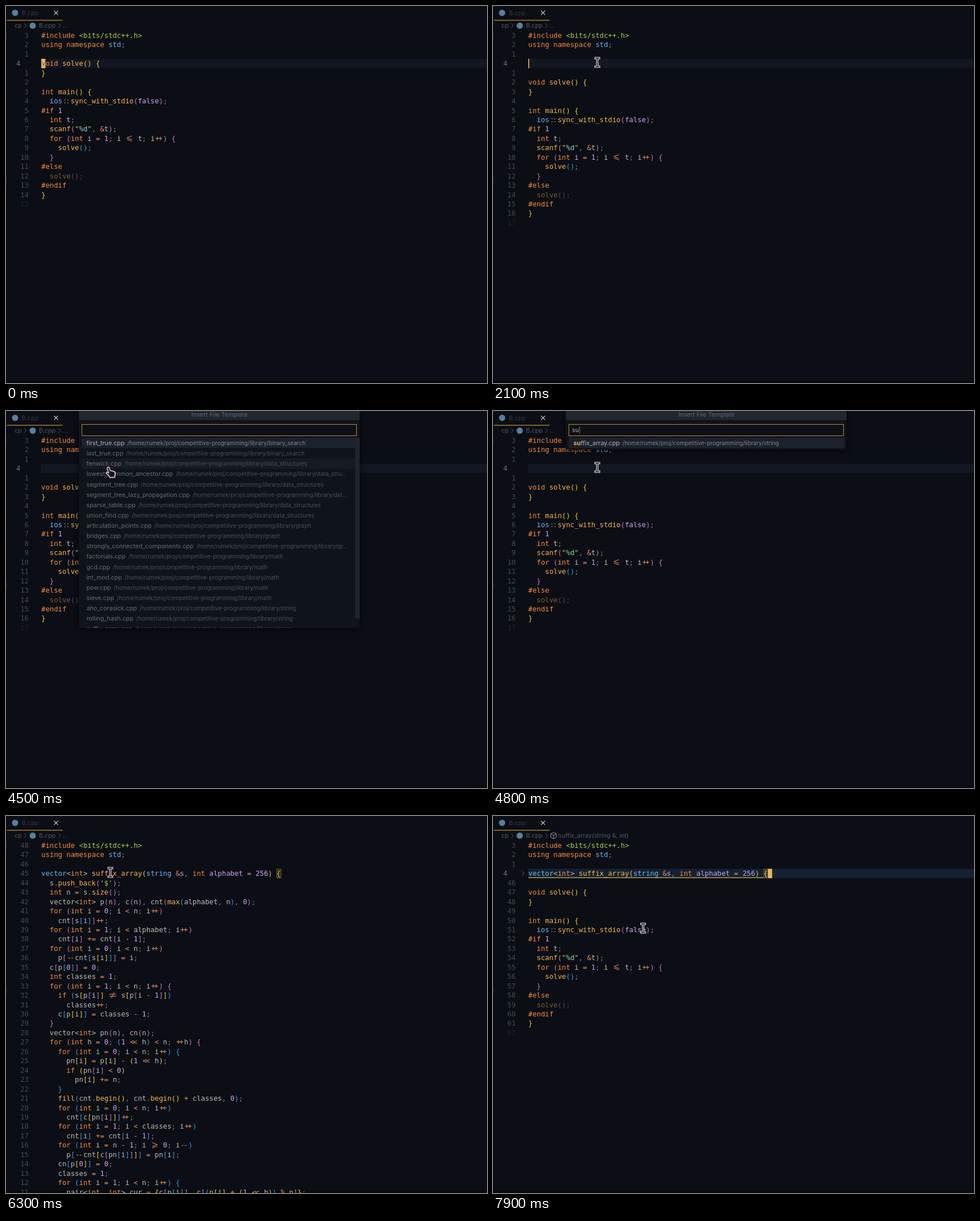
These frames come from a looping animation (846x662 px, 8000 ms). An HTML page:

```html
<!DOCTYPE html>
<html lang="en">
<head>
<meta charset="utf-8">
<title>Inserting a file template</title>
<style>
html, body { margin: 0; width: 100%; height: 100%; overflow: hidden; background: #0b0e14; }
svg { display: block; }
text { white-space: pre; }
.code { font: 12.27px "DejaVu Sans Mono", monospace; }
.ui { font: 10.7px Inter, sans-serif; }
.path { font-size: 10px; }
.panel { filter: drop-shadow(0 1px 5px #000a); }
</style>
</head>
<body>
<svg id="stage" width="846" height="662" viewBox="0 0 846 662"></svg>
<script>
(() => {
const LOOP = 8000;
const X0 = 62, TOP = 43.4, CELL = 7.39, ROW = 16.45, PICK = 18.13;
const stage = document.getElementById('stage');

const C = {
  bg: '#0b0e14', text: '#bfbdb6', keyword: '#f78b3f', func: '#fbb153', type: '#6bb8ec',
  string: '#a9cf4b', format: '#8fd6bf', number: '#cda4f5', op: '#ee9365', punct: '#83837f',
  accent: '#e6b450', icon: '#587f9b', crumb: '#535862'
};
const BRACKETS = ['#f0c832', '#cb72cc', '#2f9fe8'];

const HEAD = ['#include <bits/stdc++.h>', 'using namespace std;', ''];
const TAIL = `void solve() {
}

int main() {
  ios::sync_with_stdio(false);
#if 1
  int t;
  scanf("%d", &t);
  for (int i = 1; i <= t; i++) {
    solve();
  }
#else
  solve();
#endif
}
`.split('\n');
const SUFFIX = `vector<int> suffix_array(string &s, int alphabet = 256) {
  s.push_back('$');
  int n = s.size();
  vector<int> p(n), c(n), cnt(max(alphabet, n), 0);
  for (int i = 0; i < n; i++)
    cnt[s[i]]++;
  for (int i = 1; i < alphabet; i++)
    cnt[i] += cnt[i - 1];
  for (int i = 0; i < n; i++)
    p[--cnt[s[i]]] = i;
  c[p[0]] = 0;
  int classes = 1;
  for (int i = 1; i < n; i++) {
    if (s[p[i]] != s[p[i - 1]])
      classes++;
    c[p[i]] = classes - 1;
  }
  vector<int> pn(n), cn(n);
  for (int h = 0; (1 << h) < n; ++h) {
    for (int i = 0; i < n; i++) {
      pn[i] = p[i] - (1 << h);
      if (pn[i] < 0)
        pn[i] += n;
    }
    fill(cnt.begin(), cnt.begin() + classes, 0);
    for (int i = 0; i < n; i++)
      cnt[c[pn[i]]]++;
    for (int i = 1; i < classes; i++)
      cnt[i] += cnt[i - 1];
    for (int i = n - 1; i >= 0; i--)
      p[--cnt[c[pn[i]]]] = pn[i];
    cn[p[0]] = 0;
    classes = 1;
    for (int i = 1; i < n; i++) {
      pair<int, int> cur = {c[p[i]], c[(p[i] + (1 << h)) % n]};`.split('\n');

const DOCS = {
  start: [...HEAD, ...TAIL],
  one: [...HEAD, '', ...TAIL],
  two: [...HEAD, '', '', ...TAIL],
  full: [...HEAD, ...SUFFIX],
  folded: [...HEAD, SUFFIX[0], '', ...TAIL]
};

const LIB = '/home/rumek/proj/competitive-programming/library/';
const FILES = [
  ['first_true', 'binary_search'], ['last_true', 'binary_search'],
  ['fenwick', 'data_structures'], ['lowest_common_ancestor', 'data_stru…'],
  ['segment_tree', 'data_structures'], ['segment_tree_lazy_propagation', 'dat…'],
  ['sparse_table', 'data_structures'], ['union_find', 'data_structures'],
  ['articulation_points', 'graph'], ['bridges', 'graph'],
  ['strongly_connected_components', 'gr…'], ['factorials', 'math'],
  ['gcd', 'math'], ['int_mod', 'math'], ['pow', 'math'], ['sieve', 'math'],
  ['aho_corasick', 'string'], ['rolling_hash', 'string'], ['suffix_array', 'string']
];

// Each step changes part of the state and holds until the next one.
const STEPS = [
  [0, { doc: 'start', cur: 3, caret: 'block', mouse: null, query: null, input: false }],
  [100, { cur: 2 }],
  [300, { mouse: ['beam', 183.5, 99] }],
  [700, { caret: '' }],
  [1000, { cur: 1, caret: 'block' }],
  [1200, { doc: 'one', cur: 2, caret: 'bar' }],
  [1700, { doc: 'two', cur: 3 }],
  [2600, { caret: '' }],
  [3100, { caret: 'bar' }],
  [3600, { caret: '' }],
  [3900, { query: '', input: true }],
  [4000, { mouse: ['hand', 183.5, 107] }],
  [4500, { input: false }],
  [4700, { query: 's', input: true, mouse: ['beam', 183.5, 99] }],
  [4800, { query: 'su' }],
  [5000, { query: 'suf' }],
  [5100, { query: 'suff' }],
  [5200, { query: 'suffix' }],
  [5600, { input: false }],
  [6000, { query: null, caret: 'bar' }],
  [6200, { doc: 'full', cur: 48, caret: '' }],
  [6500, { doc: 'folded', cur: 3, caret: 'block' }],
  [7000, { caret: '' }],
  [7500, { caret: 'block' }],
  [7900, { mouse: ['beam', 264, 197] }]
];

const esc = s => s.replace(/&/g, '&amp;').replace(/</g, '&lt;');
const rect = (x, y, w, h, fill, more = '') =>
  `<rect x="${x}" y="${y}" width="${w}" height="${h}" fill="${fill}" ${more}/>`;
const text = (x, y, s, fill, cls = 'code', more = '') =>
  `<text class="${cls}" x="${x}" y="${y}" fill="${fill}" ${more}>${esc(s)}</text>`;
const line = (d, color, width = 1) =>
  `<path d="${d}" fill="none" stroke="${color}" stroke-width="${width}"/>`;
const dot = (x, y) => `<circle cx="${x}" cy="${y}" r="5.5" fill="${C.icon}"/>`;
const rowTop = row => TOP + row * ROW;
const baseline = row => rowTop(row) + 12.5;
const colX = col => X0 + col * CELL;

const TOKEN = /#\w+|<bits[^>]*>|'[^']*'|%d|\w+|\+\+|--|<<|<=|>=|!=|::|[^\s\w]/g;
const KEYWORDS = /^(#\w+|using|namespace|int|void|for|if)$/;
const TYPES = /^(std|ios|string)$/;
const VARS = /^(p|c|cnt|pn|cn)$/;
const PAIRS = /^(\+\+|--|<<|<=|>=|!=|::)$/;

function tokenColor(tok, src, at) {
  if (KEYWORDS.test(tok)) return C.keyword;
  if (tok === '%d') return C.format;
  if (/^(<bits|"|')/.test(tok)) return C.string;
  if (TYPES.test(tok) || (tok === 'vector' && at === 0)) return C.type;
  if (/^(\d+|false)$/.test(tok)) return C.number;
  if (src.startsWith('vector') && /^(s|alphabet)$/.test(tok)) return C.number;
  if (/^\w/.test(tok)) return src[at + tok.length] === '(' && !VARS.test(tok) ? C.func : C.text;
  if (/^([;,.]|::)$/.test(tok)) return C.punct;
  if (tok === '>' || (tok === '<' && src.startsWith('int', at + 1))) return C.text;
  return C.op;
}

// Two-cell operators drawn as joined signs.
function ligature(tok, x, y, fill) {
  const cx = x + CELL, cy = y - 4.4;
  if (tok === '!=') return line(`M${cx - 6} ${cy - 1.8}h12m0 3.6h-12M${cx + 2.5} ${cy - 5}l-5 10`, fill);
  if (tok === '<=' || tok === '>=') {
    const k = tok === '<=' ? 1 : -1;
    return line(`M${cx + 4.5 * k} ${cy - 4.5}l${-9 * k} 3.5l${9 * k} 3.5m0 2.6l${-9 * k} -3.5`, fill);
  }
  return text(x + 1, y, tok[0], fill) + text(x + CELL - 1, y, tok[1], fill);
}

function codeLine(src, row, depth) {
  const y = baseline(row);
  let out = '';
  for (const m of src.matchAll(TOKEN)) {
    const tok = m[0], x = colX(m.index);
    let fill;
    if (/^[(\[{]$/.test(tok)) fill = BRACKETS[depth.n++ % 3];
    else if (/^[)\]}]$/.test(tok)) fill = BRACKETS[--depth.n % 3];
    else fill = tokenColor(tok, src, m.index);
    out += PAIRS.test(tok) ? ligature(tok, x, y, fill) : text(x, y, tok, fill);
  }
  return out;
}

function editor(s) {
  const rows = DOCS[s.doc], folded = s.doc === 'folded', depth = { n: 0 };
  const y = rowTop(s.cur);
  let out = '';
  if (s.cur < rows.length) out += rect(X0, y, 784, ROW, folded ? '#142132' : '#131721');
  rows.forEach((src, i) => {
    const isCur = i === s.cur, isLast = s.doc !== 'full' && i === rows.length - 1;
    const num = isCur ? i + 1 : Math.abs(i - s.cur) + (folded && i > s.cur ? 45 : 0);
    out += isCur ? text(18, baseline(i), String(num), '#6c727c')
      : text(40, baseline(i), String(num), isLast ? '#20242b' : '#444a53', 'code', 'text-anchor="end"');
    const code = codeLine(src, i, depth);
    out += rows[i - 1] === '#else' ? `<g opacity=".48">${code}</g>` : code;
    if (folded && isCur) depth.n--;
  });
  if (s.doc === 'full' || folded)
    out += rect(colX(56) + .5, rowTop(3) + .5, CELL, ROW - 1, '#e6b45022', 'stroke="#6d6238"');
  if (folded) {
    out += rect(X0, y + 15, 414, 1.2, '#d9b73c') + line(`M51 ${y + 4.5}l4 3.7l-4 3.7`, '#666c76')
      + text(colX(57) + 1, baseline(3), '⋯', '#666c76') + rect(493, y + 8, 1.5, 1.5, '#565c66');
  }
  if (s.caret === 'bar') out += rect(X0, y, 1.7, ROW, C.accent);
  if (s.caret === 'block') {
    const ch = folded ? '' : rows[s.cur][0] || '';
    out += rect(folded ? colX(57) + .3 : X0, y, CELL, ROW, '#f0b74c') + text(X0, baseline(s.cur), ch, '#3c6c9c');
  }
  return out;
}

function header(s) {
  const chevron = x => line(`M${x} 30.5l4 4l-4 4`, C.crumb);
  const out = dot(16, 12) + text(28, 15.5, 'B.cpp', '#353a42', 'ui')
    + line('M84.5 8.5l7 7m0 -7l-7 7', '#c8c8c6', 1.1) + rect(1.5, 24.5, 98, 1.1, '#d9a441')
    + text(15, 38, 'cp', C.crumb, 'ui') + chevron(32) + dot(47, 34.5)
    + text(58, 38, 'B.cpp', C.crumb, 'ui') + chevron(92);
  if (s.doc !== 'folded') return out + text(99.5, 38, '…', C.crumb, 'ui');
  return out + line('M106.5 29l5 2.5v6l-5 2.5l-5 -2.5v-6zM101.5 31.5l5 2.5l5 -2.5M106.5 34v6', '#a582b8')
    + text(115, 38, 'suffix_array(string &, int)', C.crumb, 'ui');
}

function matches(query) {
  const rank = ([name]) => (name.startsWith(query) ? name.length : 99);
  const found = FILES.filter(([name]) => name.includes(query));
  return query ? found.sort((a, b) => rank(a) - rank(b) || (a[0] < b[0] ? -1 : 1)) : found;
}

function pickRow([name, dir], i, query) {
  const y = 60 + i * PICK, at = name.indexOf(query), end = at + query.length;
  const label = `${name.slice(0, at)}<tspan font-weight="700" fill="${C.accent}">${query}</tspan>${name.slice(end)}.cpp`;
  return `<text class="ui" x="141.5" y="${y}" fill="${i ? '#676c75' : '#b9b0b3'}">${label}`
    + `<tspan class="path" dx="5" fill="${i ? '#4a4f58' : '#7d828a'}">${LIB}${dir}</tspan></text>`;
}

function picker(s) {
  const files = matches(s.query), height = Math.min(381, 50 + files.length * PICK);
  let out = rect(128, 0, 494, height, '#0f131a') + rect(128, 0, 494, 16, '#22262d', 'rx="2"')
    + text(375.5, 10, 'Insert File Template', '#646973', 'ui', 'text-anchor="middle"')
    + rect(133.5, 23.5, 483, 20, '#0d1017', 'stroke="#b98d3a"')
    + rect(133, 47, 485, PICK, '#1c222c');
  if (s.mouse[0] === 'hand') out += rect(133, 47 + 2 * PICK, 485, PICK, '#161b23');
  out += files.map((f, i) => pickRow(f, i, s.query)).join('');
  if (files.length === FILES.length) out += rect(614, 47, 8, 317, '#20252d');
  const caret = s.input ? '<tspan font-weight="300" fill="#e6b450">|</tspan>' : '';
  out += `<text class="ui" x="139" y="37" fill="#b4b7bc">${s.query}${caret}</text>`;
  return `<g class="panel"><svg x="128" width="494" height="${height}" viewBox="128 0 494 ${height}">${out}</svg></g>`;
}

function pointer([kind, x, y]) {
  if (kind === 'hand')
    return `<path transform="translate(${x} ${y})" d="M-4.5 -8q2 -1.2 3 1l1.4 4.5l5.6 1.3q3.2 .8 3 4l-.6 3.2v3.6h-9l-1 -2.6l-5 -4.4q-.8 -2.2 1.8 -2l2.4 1.2l-2.8 -8q-.4 -1.4 1.2 -1.8z" fill="#15171d" stroke="#d8c6d0" stroke-width="1.7" stroke-linejoin="round"/>`;
  const d = `M${x - 3} ${y - 7.5}h6m-3 0v15m-3 0h6`;
  return `<g stroke-linecap="square">${line(d, '#cfcad2', 4)}${line(d, '#15171d', 1.3)}</g>`;
}

function draw(t) {
  const s = Object.assign({}, ...STEPS.filter(([at]) => at <= t).map(([, change]) => change));
  return rect(0, 0, 846, 662, C.bg) + rect(0, 659, 846, 3, '#05070a')
    + rect(0, 45, 1, 14, '#20252d') + rect(0, 299, 1, 15, '#20252d')
    + header(s) + editor(s) + (s.query === null ? '' : picker(s)) + (s.mouse ? pointer(s.mouse) : '');
}

let shown = -1;
function tick() {
  const t = performance.now() % LOOP;
  const step = STEPS.filter(([at]) => at <= t).length;
  if (step !== shown) {
    shown = step;
    stage.innerHTML = draw(t);
  }
  requestAnimationFrame(tick);
}
tick();
})();
</script>
</body>
</html>
```
